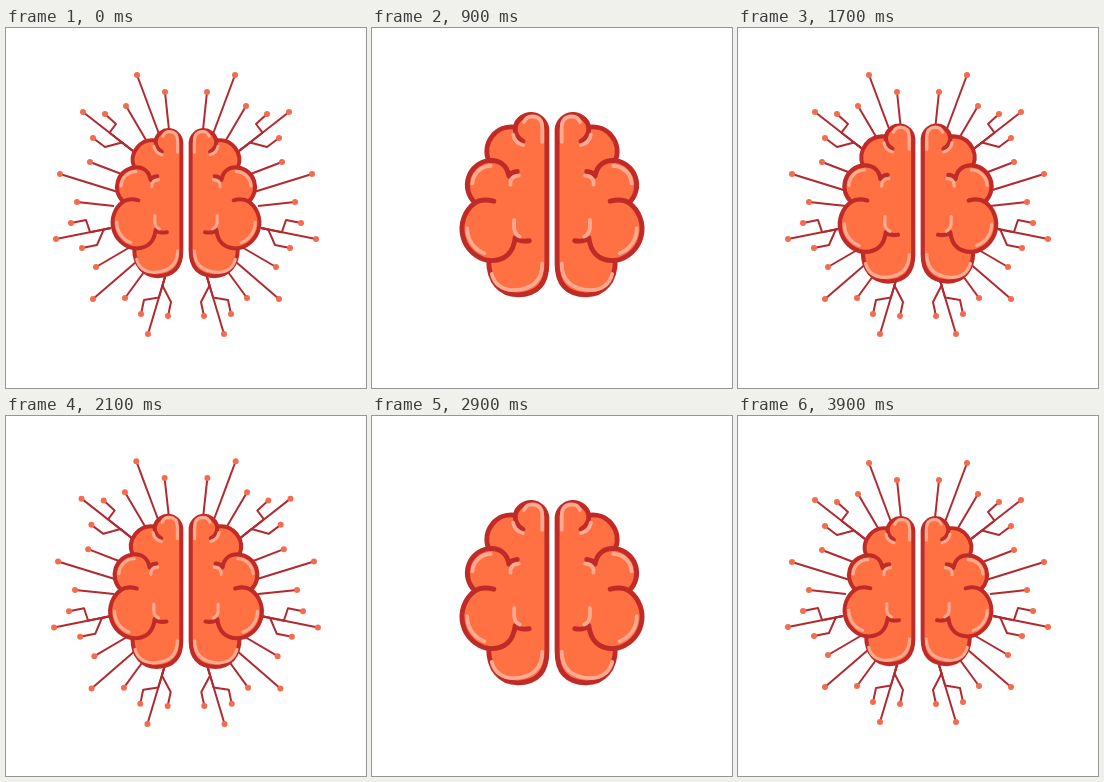
Write an HTML page that moves like this. It is 360 px wide and 360 px high and loops after 4 s.

```html
<!DOCTYPE html>
<html lang="en">
<head>
<meta charset="utf-8">
<title>Brain pulse</title>
<style>
html, body { margin: 0; width: 100%; height: 100%; overflow: hidden; background: #fff; }
svg { display: block; width: 100vw; height: 100vh; }
path { fill: none; stroke-linecap: round; stroke-linejoin: round; }
.body { fill: #ff7043; }
.body, .fold { stroke: #c02b28; stroke-width: 4.7; }
.shine { stroke: #ffab91; stroke-width: 3.6; }
.ray { stroke: #b02a30; stroke-width: 2; stroke-linecap: butt; }
.dot { fill: #f46b4e; }
</style>
</head>
<body>
<svg viewBox="0 0 360 360">
  <defs>
    <g id="half">
      <g id="rays"></g>
      <g id="lobes">
        <path class="body" d="M175 104A15.500 16 0 0 0 144.500 102A23.500 23.500 0 0 0 119 134A23.500 23.500 0 0 0 106 174.500A31 31 0 0 0 119 230C119 250 130 263 147 263Q175 262 175 233Z"/>
        <path class="fold" d="M144.500 102Q144 111 152 115.500M119 134C130 133 137 139 138.500 149Q140 145 146.500 144.500M106 174.500Q113 170 124 173M119 230C135 231 143 222 144.500 208Q148 212.500 158 211"/>
        <path class="shine" d="M153 97Q155 91.500 161 91.500Q170.500 92 170.500 102V116M142.500 109Q144 117 152 119M103.500 156A18 18 0 0 1 121 139M140 157Q139.500 149 148 148.500M98.500 199A25 25 0 0 0 115 223M143.500 191V199Q144 205 149 207M122 243Q126 258 143 258.500Q170.500 257 170.500 233"/>
      </g>
    </g>
  </defs>
  <use href="#half"/>
  <use href="#half" transform="matrix(-1 0 0 1 360 0)"/>
</svg>
<script>
const PERIOD = 2000, STEP = 100, CX = 180, CY = 177;
const TWIG_END = .37; // slide at which a twig's dot meets its trunk

// Tip and root of each straight ray
const SPOKES = [
  [[131, 47], [153, 106]], [[159, 64], [163, 102]], [[120, 78], [140, 112]],
  [[84, 134], [118, 147]], [[54, 146], [112, 164]], [[71, 174], [108, 178]],
  [[90, 239], [126, 218]], [[87, 271], [130, 234]], [[119, 270], [138, 244]]
];
// Each twig: tip, knee, and how far along the trunk it joins
const TRUNKS = [
  { line: [[77, 84], [127, 123]], twigs: [[[99, 86], [110, 96], .53], [[87, 110], [99, 119], .78]] },
  { line: [[50, 211], [105, 200]], twigs: [[[65, 195], [80, 192], .62], [[76, 220], [91, 217], .87]] },
  { line: [[142, 306], [159, 249]], twigs: [[[135, 286], [138, 272], .64], [[162, 288], [165, 274], .85]] }
];

const rays = document.getElementById("rays");
const lobes = document.getElementById("lobes");
const clamp = x => Math.max(0, Math.min(1, x));
const lerp = (a, b, k) => a.map((v, i) => v + (b[i] - v) * k);
const dist = (a, b) => Math.hypot(b[0] - a[0], b[1] - a[1]);
const length = pts => pts.slice(1).reduce((sum, p, i) => sum + dist(pts[i], p), 0);

function add(tag, cls) {
  const el = document.createElementNS("http://www.w3.org/2000/svg", tag);
  el.setAttribute("class", cls);
  rays.appendChild(el);
  return el;
}

function makeRay(kind, pts) {
  return { kind, pts, line: add("path", "ray"), dot: add("circle", "dot") };
}

const all = SPOKES.map(pts => makeRay("spoke", pts));
for (const { line: [tip, root], twigs } of TRUNKS) {
  all.push(makeRay("trunk", [tip, root]));
  for (const [end, knee, k] of twigs)
    all.push(makeRay("twig", [end, knee, lerp(tip, root, k), root]));
}

function pushOut(p, d) {
  const r = dist([CX, CY], p);
  return lerp([CX, CY], p, 1 + d / r);
}

// What is left of a polyline after removing a length from its start
function cut(pts, len) {
  let i = 0, seg;
  while (len > (seg = dist(pts[i], pts[i + 1])) && i < pts.length - 2) {
    len -= seg;
    i++;
  }
  return [lerp(pts[i], pts[i + 1], clamp(len / seg)), ...pts.slice(i + 1)];
}

// Rises to 1 around mid and falls again
const ramp = (t, mid, reach) => clamp((reach - Math.abs(t - mid)) / 320);

function draw(ms) {
  const t = Math.floor(ms / STEP) * STEP % PERIOD;
  const size = .828 + .216 * (1 - Math.abs((t - 950) / 1000) ** 1.4);
  const trim = ramp(t, 985, 500);
  const slide = ramp(t, 960, 480);
  const push = t < 600 ? 4 * Math.sin(Math.PI * t / 600) : 0;

  lobes.setAttribute("transform",
    `translate(177.300 168.500) scale(${size}) translate(-177.300 -168.500)`);

  for (const { kind, pts, line, dot } of all) {
    const path = pts.map((p, i) => i < pts.length - 1 ? pushOut(p, push) : p);
    const whole = length(path);
    const gone = kind === "twig" ? slide / TWIG_END * length(path.slice(0, 3))
      : whole * (kind === "trunk" ? slide : trim);
    const rest = cut(path, kind === "trunk" ? Math.max(gone, whole * trim) : gone);
    const [x, y] = cut(path, gone)[0];
    line.setAttribute("d", "M" + rest.map(p => p.join(" ")).join("L"));
    dot.setAttribute("cx", x);
    dot.setAttribute("cy", y);
    dot.setAttribute("r", 3 + Math.min(slide, .4) * 1.6);
  }
}

const start = performance.now();
function tick() {
  draw(performance.now() - start);
  requestAnimationFrame(tick);
}
tick();
</script>
</body>
</html>
```
